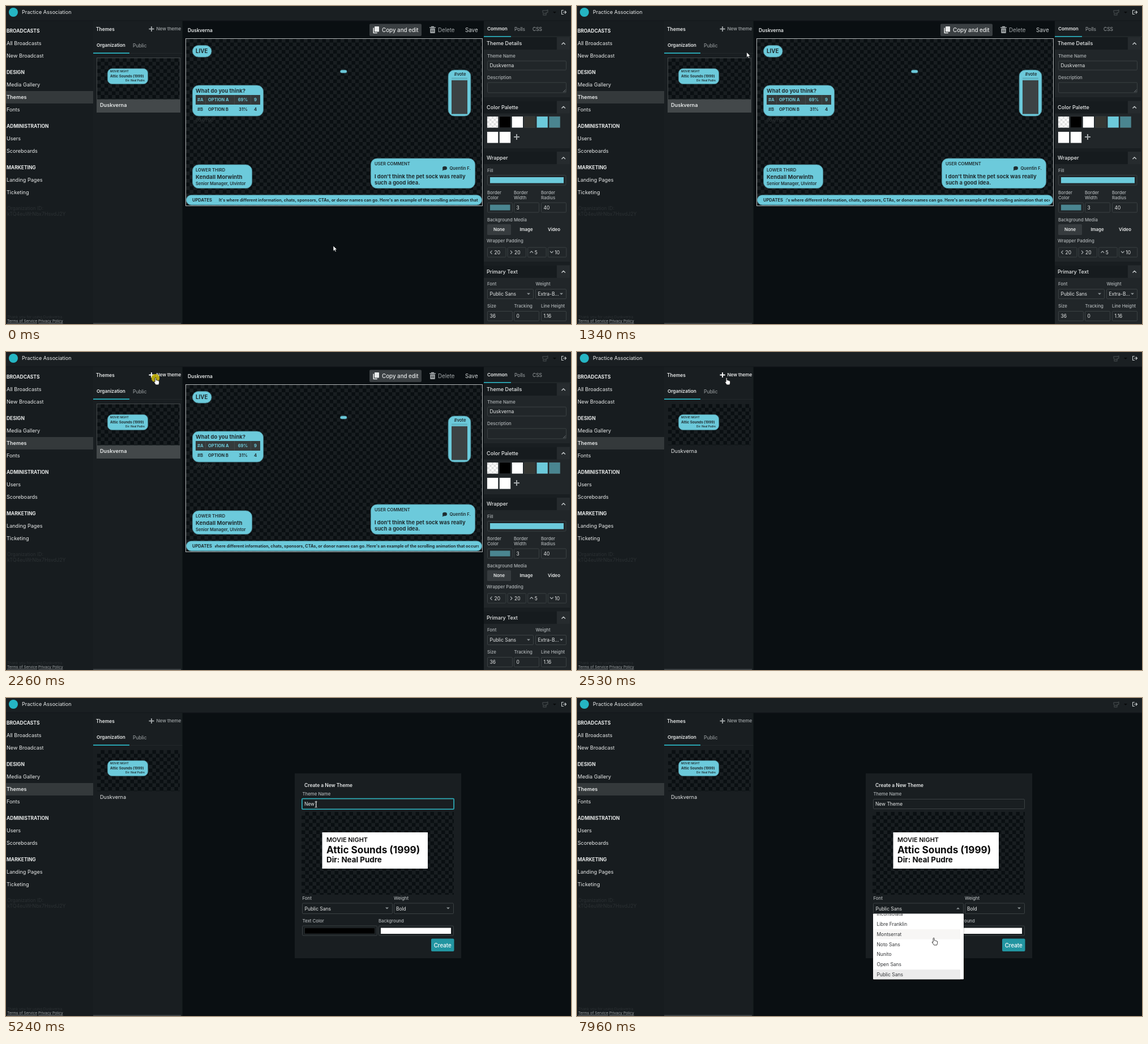
An HTML page that plays this animation: 998 by 561 pixels, repeating every 8 s.

```html
<!DOCTYPE html>
<html lang="en">
<head>
<meta charset="utf-8">
<title>New theme</title>
<style>
html, body { margin: 0; width: 100%; height: 100%; overflow: hidden; background: #0a0f12; }
svg { display: block; width: 100%; height: 100%; }
text { font-family: Inter, "Open Sans", sans-serif; white-space: pre; }
</style>
</head>
<body>
<svg id="stage" viewBox="0 0 998 561"></svg>
<script>
const LOOP = 8000;
const CYAN = '#6ccadb', TEAL = '#4a8590', INK = '#1f2d31', PANEL = '#191e21', DARK = '#0a0f12';
const LIGHT = '#e8eaea', GREY = '#a3a8aa', EDGE = '#3b4143', DIM = '#2c3134';
const BRAND = 'Duskverna', FILM = 'Attic Sounds (1999)', DIRECTOR = 'Dir: Neal Pudre';
// type sizes of the interface, and the checkerboard tile
const XS = 7.8, S = 8.45, M = 9.1, L = 9.75, TILE = 13;

const rect = (x, y, x2, y2, fill, r = 0, more = '') =>
  `<rect x="${x}" y="${y}" width="${x2 - x}" height="${y2 - y}" rx="${r}" fill="${fill}" ${more}/>`;
// cy is the middle of the capitals
const text = (x, cy, s, size, fill = LIGHT, weight = 400, more = '') =>
  `<text x="${x}" y="${cy + size * 0.36}" font-size="${size}" fill="${fill}" font-weight="${weight}" ${more}>${s}</text>`;
const path = (d, stroke, w = 1.2, fill = 'none') =>
  `<path d="${d}" stroke="${stroke}" stroke-width="${w}" fill="${fill}" stroke-linejoin="round"/>`;
const MID = 'text-anchor="middle"', END = 'text-anchor="end"';
const box = (x, y, x2, y2) => rect(x + .5, y + .5, x2 - .5, y2 - .5, 'none', 1.5, `stroke="${EDGE}"`);
const bubble = (x, y, x2, y2, r) =>
  rect(x + .4, y + .4, x2 - .4, y2 - .4, CYAN, r, `stroke="${TEAL}" stroke-width=".8"`);
const caretDown = (x, y, c = '#8f9698') => path(`M${x - 3} ${y - 1.5}h6l-3 3z`, 'none', 0, c);
const checker = (x, y, x2, y2) =>
  `<svg x="${x}" y="${y}" width="${x2 - x}" height="${y2 - y}">` +
  rect(0, 0, x2 - x, y2 - y, 'url(#check)') + '</svg>';
const plus = (x, y, c, r = 4.5, w = 1.8) => path(`M${x - r} ${y}h${2 * r}M${x} ${y - r}v${2 * r}`, c, w);

function sidebar() {
  const groups = [
    [44, 'BROADCASTS', 'All Broadcasts', 'New Broadcast'],
    [117, 'DESIGN', 'Media Gallery', 'Themes', 'Fonts'],
    [212, 'ADMINISTRATION', 'Users', 'Scoreboards'],
    [285, 'MARKETING', 'Landing Pages', 'Ticketing']
  ];
  let s = rect(0, 26, 312, 561, PANEL) + rect(0, 26, 154, 561, '#171c1f') + rect(0, 150, 154, 172, '#34393b');
  for (const [y, head, ...items] of groups) {
    s += text(1, y, head, S, LIGHT, 700);
    items.forEach((item, i) => s += text(1, y + 22 + i * 21.8, item, M, LIGHT, item === 'Themes' ? 600 : 400));
  }
  return s + text(2, 357, 'Organization ID:', S, DIM) + text(2, 367, 'kTQ4euWrNbx7HsvdJ2Y', 8.8, DIM) +
    text(2, 549, `Thank you for using ${BRAND}`, 6.6, DIM) +
    text(2, 556, 'Terms of Service', 6.6, GREY, 400, 'text-decoration="underline"') +
    text(57, 556, 'Privacy Policy', 6.6, GREY, 400, 'text-decoration="underline"');
}

function topBar() {
  return rect(0, 0, 998, 26, '#1a1f22') + rect(0, 25.5, 998, 26.5, '#12171a') +
    '<circle cx="13" cy="11" r="8" fill="#25b5c3"/>' +
    text(28, 11, 'Practice Association', M) +
    path('M948 8h7l2 -1v4l-3 1v4h-5v-4l-1 -1zM950 13h5', '#3c4244', 1.4) + caretDown(969, 11.5, '#07090a') +
    path('M985 7.5h-3.5v7h3.5M984 11h5.5M987 8.5l2.5 2.5l-2.5 2.5', '#c3c8c9', 1.1);
}

function themeList() {
  return text(159, 41, 'Themes', S, LIGHT, 600) + text(160, 69.5, 'Organization', 8.2, LIGHT, 600) +
    text(224, 69.5, 'Public', S, GREY) + rect(154, 83, 312, 84, '#22282a') + rect(154, 82.3, 218, 84, '#2cb8c6') +
    '<g id="picked">' + rect(160, 91, 308, 188, '#43484a') + rect(161, 92, 307, 164.5, PANEL) + '</g>' +
    checker(161, 92, 307, 164.5) + bubble(179, 110, 251, 138, 8) +
    text(184, 115.5, 'MOVIE NIGHT', 4.9, INK, 600) + text(184, 123.8, FILM, 6.2, INK, 700) +
    text(245, 131.3, DIRECTOR, 4.7, INK, 600, END) +
    text(166, 175, BRAND, M, LIGHT, 400, 'id="thumbName"') + rect(154, 559, 309, 561, '#3a3f42');
}

function preview() {
  let s = text(321, 42.5, BRAND, S, LIGHT, 600) +
    rect(642, 31.5, 734, 53, '#3a3f42', 2) +
    rect(651, 36, 659, 45.5, LIGHT, .8) + path('M649.2 38.5v9h6.5', LIGHT, 1.6) +
    text(664, 42, 'Copy and edit', L, LIGHT, 500) +
    path('M748 38h11M751.5 38v-1.5h4v1.5', GREY, 1.3) + rect(749.2, 39.5, 757.8, 48, GREY, 1) +
    path('M751.5 41.5v4.5M753.5 41.5v4.5M755.5 41.5v4.5', '#14191b', .7) +
    text(763, 42, 'Delete', L, GREY) + text(811, 42, 'Save', L, '#cfd3d4') +
    rect(317, 57, 842, 353, PANEL) + checker(318, 58, 841, 352) +
    rect(317.5, 57.5, 841.5, 352.5, 'none', 0, 'stroke="#b4b8b9"');

  s += bubble(329, 69, 363.5, 90.5, 10.5) + text(335, 80, 'LIVE', 9.7, INK, 700) + bubble(590, 112.5, 602.5, 118.5, 3);

  s += bubble(780.7, 112.5, 821.3, 194.5, 11) + text(802, 120, '#vote', 7.6, INK, 600, MID) +
    rect(787, 126, 815, 130, '#62b7c6') + rect(787, 131, 815, 190.5, '#3c4244');

  s += bubble(329, 139.5, 455, 194.5, 11) + text(335, 150, 'What do you think?', 9.35, INK, 700) +
    rect(335, 157, 449, 174, '#343a3b');
  for (const x of [352.5, 403, 432]) s += rect(x, 157, x + .5, 174, '#50595b');
  [['#A', 'OPTION A', '69%', '9', 165.5, CYAN], ['#B', 'OPTION B', '31%', '4', 182.5, INK]].forEach(
    ([key, name, part, n, y, c]) => s += text(338, y, key, 7.8, c, 600) + text(357, y, name, 7.5, c, 700) +
      text(427, y, part, 7.5, c, 700, END) + text(440.5, y, n, 7.6, c, 700, MID));
  s += text(335, 201, '00:01:00', 7.2, '#2a3032', 600);

  s += bubble(329, 279.5, 435, 322, 11) + text(335, 289, 'LOWER THIRD', 7.6, INK, 600) +
    text(335, 301.5, 'Kendall Morwinth', 9.65, INK, 700) + text(335, 313, 'Senior Manager, Ulvintor', 7.4, INK, 600);

  s += bubble(644, 268.5, 829, 322, 11) + text(651, 278, 'USER COMMENT', 7.6, INK, 600) +
    '<ellipse cx="775" cy="286" rx="4" ry="3.3" fill="#1f2d31"/>' + path('M772 287l-1.5 3.5l4 -1.5z', 'none', 0, INK) +
    text(821, 286.3, 'Quentin F.', 7.6, INK, 600, END) +
    text(651, 300.3, "I don't think the pet sock was really", 9.35, INK, 700) +
    text(651, 311.8, 'such a good idea.', 9.35, INK, 700);

  s += bubble(318, 333, 841, 351.5, 9) + text(329, 342, 'UPDATES', 7.5, INK, 700) +
    '<g clip-path="url(#tickerClip)">' + text(0, 342, "It's where different information, chats, sponsors, CTAs, or donor names can go. " +
      "Here's an example of the scrolling animation that occurs when text is long", 7.3, INK, 700, 'id="ticker"') + '</g>';
  return s;
}

function inspector() {
  const label = (x, y, s) => text(x, y, s, XS, '#b0b5b7', 500);
  const field = (x, y, x2, s, h = 18) => box(x, y, x2, y + h) + text(x + 4.5, y + h / 2, s, S);
  let s = rect(844, 26, 998, 561, PANEL) + rect(844, 53.5, 998, 54.5, '#2a3032') + rect(844, 53, 892, 54.6, '#2cb8c6') +
    text(850, 40.5, 'Common', 8.2, LIGHT, 600) + text(898, 40.5, 'Polls', S, GREY) + text(930, 40.5, 'CSS', S, GREY);

  [['Theme Details', 55, 161], ['Color Palette', 167.5, 251], ['Wrapper', 257, 451], ['Primary Text', 457.5, 561]].forEach(
    ([name, y, end]) => s += rect(844, y, 996, end, '#212629') + rect(844, y, 973, y + 22, '#161b1e') +
      rect(973, y, 996, y + 22, '#262b2e') + text(849, y + 11, name, M, LIGHT, 500) +
      path(`M981.5 ${y + 13}l3.2 -3.2l3.2 3.2`, '#c3c8c9', 1.4));

  s += label(850, 88, 'Theme Name') + field(850, 96.5, 990, BRAND, 17) + label(850, 126, 'Description') +
    box(850, 134.5, 990, 153.5) + path('M984 152l4.5 -4.5M986.5 152l2 -2', '#8f9698', .7);

  ['#fff', '#000', '#fff', '#353632', CYAN, TEAL, '#fff', '#fff'].forEach((c, i) => {
    const x = 850 + i % 6 * 21.9, y = i < 6 ? 195 : 222;
    s += rect(x, y, x + 19.2, y + 19.5, c, 0, 'stroke="#43494b" stroke-width=".8" paint-order="stroke"');
  });
  for (let i = 0; i < 25; i += 2) {
    const x = 850 + i % 5 * 3.8, y = 195 + Math.floor(i / 5) * 3.9;
    s += rect(x, y, x + 3.8, y + 3.9, '#dfe0e0');
  }
  s += plus(902, 231, GREY, 5, 2);

  s += label(850, 290, 'Fill') + box(850, 298, 989.5, 316.5) + rect(855, 302, 985, 312.5, CYAN) +
    label(850, 329, 'Border') + label(850, 338.5, 'Color') + label(897, 329, 'Border') + label(897, 338.5, 'Width') +
    label(945, 329, 'Border') + label(945, 338.5, 'Radius') +
    box(850, 346.5, 895, 364.5) + rect(855, 350.5, 890.5, 360.5, TEAL) +
    field(897, 346.5, 942, '3') + field(945, 346.5, 990, '40') +
    label(850, 377, 'Background Media') + rect(850, 385, 892, 404, '#363b3e', 1.5) +
    text(871, 394.5, 'None', XS, LIGHT, 600, MID) + text(919, 394.5, 'Image', XS, LIGHT, 600, MID) +
    text(968, 394.5, 'Video', XS, LIGHT, 600, MID) + label(849, 414.5, 'Wrapper Padding');
  [['20', 'M858.5 431.5l-3 3l3 3'], ['20', 'M891 431.5l3 3l-3 3'], ['5', 'M925.5 435.5l2.8 -3l2.8 3'], ['10', 'M961 432.5l2.8 3l2.8 -3']].forEach(
    ([n, d], i) => {
      const x = 850 + i * 35.6;
      s += box(x, 425.5, x + 33.5, 443.5) + path(d, GREY, 1.1) + text(x + 12.5, 434.5, n, S);
    });

  return s + label(850, 490.5, 'Font') + label(935.5, 490.5, 'Weight') + field(850, 499, 932, 'Public Sans') +
    caretDown(923, 508) + field(935, 499, 990, 'Extra-B...') + caretDown(981, 508) +
    label(850, 529.5, 'Size') + label(897.5, 529.5, 'Tracking') + label(945, 529.5, 'Line Height') +
    field(850, 538, 895, '36') + field(897, 538, 942, '0') + field(945, 538, 990, '1.16');
}

function dialog() {
  const label = (x, y, s) => text(x, y, s, XS, '#b0b5b7', 500);
  return rect(510, 133, 804, 459, PANEL) + text(527, 154, 'Create a New Theme', S, LIGHT, 600) +
    label(523.5, 169.5, 'Theme Name') + box(523, 178, 791, 196) +
    rect(522.8, 177.5, 791.2, 196.3, 'none', 1.5, 'id="focus" stroke="#27aebb" stroke-width="1.6"') +
    text(527, 187, '', S, LIGHT, 400, 'id="entry"') + rect(527, 181.5, 527.9, 192, '#fff', 0, 'id="caret"') +
    checker(522, 201, 791, 347) + rect(558.5, 237, 745, 301, '#fff') +
    text(566, 250.3, 'MOVIE NIGHT', 10.9, '#0b0b0b', 600) + text(566, 267.5, FILM, 17.2, '#0b0b0b', 700) +
    text(566, 285.5, DIRECTOR, 13.4, '#0b0b0b', 700) +
    label(523.5, 353.5, 'Font') + label(685, 353.5, 'Weight') +
    box(523, 361.5, 683, 381) + text(527.5, 371.5, 'Public Sans', S) + '<g id="arrow">' + caretDown(0, 0) + '</g>' +
    box(685, 361.5, 791, 381) + text(689, 371.5, 'Bold', S) + caretDown(781, 371) +
    label(523.5, 393.5, 'Text Color') + label(658, 393.5, 'Background') +
    box(523, 401.5, 656, 419.5) + rect(527.5, 405.5, 651.5, 416, '#000', 0, 'stroke="#3b4143" stroke-width=".5"') +
    box(658, 401.5, 791, 419.5) + rect(662, 405.5, 786, 416, '#fff') +
    rect(751, 424.5, 791.5, 447, '#2295a1', 2) + text(771.2, 436, 'Create', L, '#fff', 500, MID);
}

const ROW = 17.8, LIST_TOP = 372.3;
function menu() {
  const names = ['Inconsolata', 'Libre Franklin', 'Montserrat', 'Noto Sans', 'Nunito', 'Open Sans', 'Public Sans'];
  return rect(522.5, 381.5, 683.5, 498, '#000', 2, 'opacity=".35"') + rect(523, 380.5, 683, 496.3, '#fff', 1) +
    '<g clip-path="url(#menuClip)">' + rect(523.5, 0, 677, ROW, '#f7f6f5', 0, 'id="hover"') +
    rect(523.5, LIST_TOP + 6 * ROW, 677, LIST_TOP + 7 * ROW, '#ececec') +
    names.map((n, i) => text(529.5, LIST_TOP + (i + .5) * ROW, n, S, '#343638')).join('') + '</g>';
}

const POINTERS = `<g id="arrowPtr">${path('M0 0v9.4l2.2 -2l1.5 3.4l1.6 -.7l-1.5 -3.3h3z', '#0a0f12', .7, '#fff')}</g>
<g id="handPtr">${path('M-.9 .9q0 -1.2 1 -1.2t1 1.2v3.4q1.6 -.7 2 .5q1.5 -.6 1.9 .6q1.6 -.3 1.6 1.2v2.6l-1 3.2h-5l-3.4 -4.9q-.5 -1.3 1.9 -.1z', '#111', .8, '#fff')}</g>
<g id="beamPtr">${path('M-2 -5q2 0 2 1q0 -1 2 -1M0 -4v8M-2 5q2 0 2 -1q0 1 2 1', '#e8eaea', .9)}</g>`;

stage.innerHTML = `<defs>
<pattern id="check" width="${TILE}" height="${TILE}" patternUnits="userSpaceOnUse">
${rect(TILE / 2, 0, TILE, TILE / 2, DARK)}${rect(0, TILE / 2, TILE / 2, TILE, DARK)}</pattern>
<clipPath id="tickerClip">${rect(369, 334, 835, 351, '#fff')}</clipPath>
<clipPath id="menuClip">${rect(523, 380.5, 683, 496.3, '#fff')}</clipPath></defs>
${rect(0, 0, 998, 561, DARK)}${sidebar()}${themeList()}
<g id="newTheme">${plus(257, 40.5, 'currentColor')}${text(265.5, 40.5, 'New theme', 8.05, 'currentColor', 500)}</g>
${rect(311.5, 26, 312.5, 561, '#0d1214')}
<g id="editor">${preview()}${inspector()}</g><g id="creator">${dialog()}</g>${topBar()}
<g id="menu">${menu()}</g><circle id="ripple" fill="#d8c40c"/><g id="pointer">${POINTERS}</g>`;

const $ = id => document.getElementById(id);
const show = (id, on) => $(id).setAttribute('visibility', on ? 'inherit' : 'hidden');
const move = (id, x, y) => $(id).setAttribute('transform', `translate(${x} ${y})`);

// time, x, y of the pointer's hot spot
const TRACK = [
  [0, 578, 423], [610, 578, 423], [950, 478, 270], [1400, 275, 56], [1490, 264, 45.5],
  [3070, 264, 45.5], [3410, 467, 159], [3810, 541, 185], [3910, 547.5, 188],
  [6690, 547.5, 188], [7100, 625, 300], [7440, 671, 366], [7640, 671, 366], [7960, 630, 423.5], [LOOP, 630, 423.5]
];
const slope = (i, k) => {
  const [a, b, c] = [TRACK[i - 1], TRACK[i], TRACK[i + 1]];
  if (!a || !c || a[1] === b[1] || b[1] === c[1]) return 0;
  return (c[k] - a[k]) / (c[0] - a[0]);
};
function pointerAt(t) {
  let i = 0;
  while (i < TRACK.length - 2 && t >= TRACK[i + 1][0]) i++;
  const a = TRACK[i], b = TRACK[i + 1], d = b[0] - a[0], u = (t - a[0]) / d, v = 1 - u;
  return [1, 2].map(k => a[k] * v * v * (1 + 2 * u) + b[k] * u * u * (3 - 2 * u) +
    d * u * v * (slope(i, k) * v - slope(i + 1, k) * u));
}

const TYPED = 'New Theme', KEYS = [4910, 5080, 5160, 5240, 5440, 5600, 5680, 5750, 5830];
const CLICKS = [[2255, 264, 46], [7490, 671, 367]];
const LEAVE = 2430, OPEN = 2560, BLUR = 7470, DROP = 7550;

function draw(t) {
  const [x, y] = pointerAt(t);
  const inside = (l, top, r, bottom) => x > l && x < r && y > top && y < bottom;
  const onNew = inside(252, 35, 310, 50), formOpen = t >= OPEN;

  show('editor', t < LEAVE);
  show('picked', t < LEAVE);
  $('thumbName').setAttribute('font-weight', t < LEAVE ? 600 : 400);
  show('creator', formOpen);
  $('newTheme').setAttribute('color', onNew ? '#ffffff' : GREY);

  // the ticker stalls between 110 and 610
  const run = (t < 80 ? 0 : Math.min(t, 110) - 50) + Math.max(0, t - 610);
  move('ticker', 376 - run * 0.0136, 0);

  const count = KEYS.filter(k => t >= k).length;
  $('entry').textContent = count ? TYPED.slice(0, count) : 'Untitled theme';
  $('entry').setAttribute('fill', count ? LIGHT : '#6f7678');
  const last = count ? KEYS[count - 1] : 2520;
  const focused = formOpen && t < BLUR;
  show('focus', focused);
  show('caret', focused && Math.floor((t - last) / 530) % 2 === 0);
  $('caret').setAttribute('x', 527 + (count ? $('entry').getComputedTextLength() : 0));

  const open = t >= DROP;
  show('menu', open);
  $('arrow').setAttribute('transform', `translate(673 371) scale(1 ${open ? -1 : 1})`);
  const row = Math.floor((y - LIST_TOP) / ROW);
  show('hover', open && y > 381);
  move('hover', 0, LIST_TOP + row * ROW);

  const click = CLICKS.find(c => t >= c[0] && t < c[0] + 175);
  show('ripple', click);
  if (click) {
    const u = (t - click[0]) / 175, r = $('ripple');
    r.setAttribute('cx', click[1]);
    r.setAttribute('cy', click[2]);
    r.setAttribute('r', 7 + 8 * u);
    r.setAttribute('opacity', 0.85 * (1 - u));
  }

  const beam = formOpen && inside(523, 178, 790, 196);
  const hand = onNew || formOpen && inside(523, 362, 683, 496);
  show('beamPtr', beam);
  show('handPtr', hand);
  show('arrowPtr', !beam && !hand);
  move('pointer', x, y);
}

const start = performance.now();
function tick() {
  draw((performance.now() - start) % LOOP);
  requestAnimationFrame(tick);
}
tick();
</script>
</body>
</html>
```
